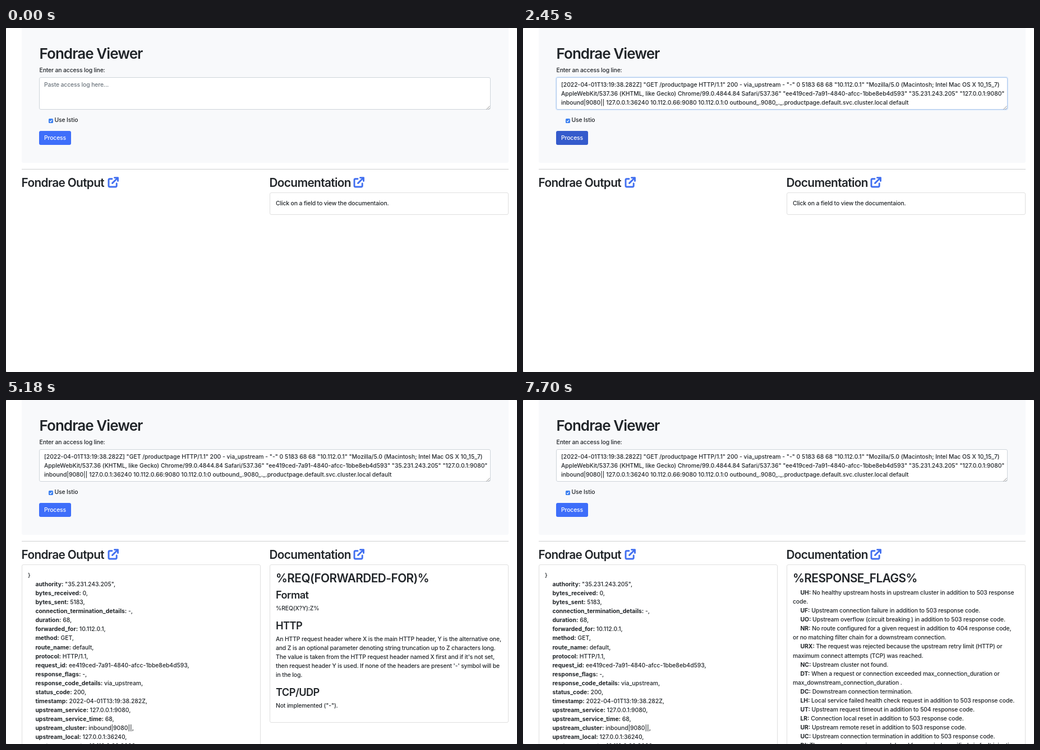
Write an HTML page that moves like this. It is 911 px wide and 615 px high and loops after 8.4 s.

```html
<!DOCTYPE html>
<html lang="en">
<head>
<meta charset="utf-8">
<title>Fondrae Viewer</title>
<style>
  html { font-size: 10.72px; background: #bbb; }
  html, body { margin: 0; width: 100%; height: 100%; overflow: hidden; }
  * { box-sizing: border-box; }
  #stage {
    position: relative; width: 911px; height: 615px; overflow: hidden;
    background: #fff; border-radius: 2px; color: #212529;
    font: 480 .97rem/1.5rem Inter, sans-serif; font-optical-sizing: none;
    letter-spacing: -.0125em; white-space: pre;
  }
  #stage > * { position: absolute; }
  h1, h2, h3 { margin: 0; font-weight: 580; }
  h1 { font-size: 2.425rem; line-height: 3rem; letter-spacing: -.036em; }
  h2 { font-size: 1.94rem; line-height: 2.4rem; letter-spacing: -.031em; }
  h3 { font-size: 1.6975rem; line-height: 2.1rem; letter-spacing: -.031em; margin-bottom: .5rem; }
  p { margin: 0 0 1rem; }
  b { margin-left: 1.25rem; letter-spacing: 0; }
  svg { fill: none; }
  #banner { left: 28px; top: 0; width: 868px; height: 241px; background: #f8f9fb; border-radius: 0 0 3px 3px; }
  #log { left: 59px; top: 88px; width: 805px; height: 58px; padding: 4.5px 8px; border: 1px solid; border-radius: 3px; background: #fff; }
  #log, #output { letter-spacing: -.0015em; }
  #log.empty { color: #6c757d; letter-spacing: inherit; }
  #caret { display: inline-block; width: 1px; height: 12px; margin-right: -1px; vertical-align: -2px; background: #212529; }
  #button { left: 59px; top: 184px; width: 57px; height: 25px; border-radius: 3px; color: #fff; text-align: center; line-height: 25px; }
  #rule { left: 28px; top: 252px; width: 868px; height: 1px; background: #cfd0d1; }
  .card { top: 294px; padding: 10.9px 10px; border: 1px solid #dfdfdf; border-radius: 3px; background: #fff; }
  .card h2 { margin-bottom: .5rem; letter-spacing: -.026em; }
  #output { left: 28px; width: 426px; height: 400px; }
  #docs { left: 470px; width: 426px; }
  .link { top: 266px; width: 20px; height: 20px; stroke: #416ff0; stroke-width: 2.9; stroke-linecap: round; stroke-linejoin: round; }
</style>
</head>
<body>
<div id="stage">
  <div id="banner"></div>
  <h1 style="left:59.5px;top:30px">Fondrae Viewer</h1>
  <div style="left:59.5px;top:67.5px">Enter an access log line:</div>
  <div id="log"></div>
  <svg style="left:856px;top:139px" width="7" height="7" stroke="#777" stroke-width=".8"><path d="M.5 6.5l6-6M3.8 6.5l2.7-2.7"/></svg>
  <svg style="left:76px;top:162px" width="8" height="8"><rect width="8" height="8" rx="1.6" fill="#3b7ff0"/><path d="M2 4.2l1.5 1.6L6.1 2.2" stroke="#fff" stroke-width="1.1"/></svg>
  <div style="left:86.5px;top:157px">Use Istio</div>
  <div id="button">Process</div>
  <div id="rule"></div>
  <h2 style="left:27.5px;top:264px">Fondrae Output</h2>
  <h2 style="left:469.5px;top:264px">Documentation</h2>
  <svg class="link" style="left:181px" viewBox="0 0 20 20"><path id="link" d="M8 3.8H4a2 2 0 0 0-2 2V16a2 2 0 0 0 2 2h10.2a2 2 0 0 0 2-2v-4M12.5 1.6h6v6M18.3 1.8L8.6 11.4"/></svg>
  <svg class="link" style="left:619px" viewBox="0 0 20 20"><use href="#link"/></svg>
  <div id="output" class="card"></div>
  <div id="docs" class="card"></div>
</div>
<script>
const LOOP = 8400, STEP = 70;
const $ = id => document.getElementById(id);

const logText = `[2022-04-01T13:19:38.282Z] "GET /productpage HTTP/1.1" 200 - via_upstream - "-" 0 5183 68 68 "10.112.0.1" "Mozilla/5.0 (Macintosh; Intel Mac OS X 10_15_7)
AppleWebKit/537.36 (KHTML, like Gecko) Chrome/99.0.4844.84 Safari/537.36" "ee419ced-7a91-4840-afcc-1bbe8eb4d593" "35.231.243.205" "127.0.0.1:9080"
inbound|9080|| 127.0.0.1:36240 10.112.0.66:9080 10.112.0.1:0 outbound_.9080_._.productpage.default.svc.cluster.local default`;

// Turns "key: value" lines into lines with a bold, indented key.
const boldKeys = text => text.replace(/^(\w+:) /gm, '<b>$1</b> ');

$('output').innerHTML = '}\n' + boldKeys(`authority: "35.231.243.205",
bytes_received: 0,
bytes_sent: 5183,
connection_termination_details: -,
duration: 68,
forwarded_for: 10.112.0.1,
method: GET,
route_name: default,
protocol: HTTP/1.1,
request_id: ee419ced-7a91-4840-afcc-1bbe8eb4d593,
response_flags: -,
response_code_details: via_upstream,
status_code: 200,
timestamp: 2022-04-01T13:19:38.282Z,
upstream_service: 127.0.0.1:9080,
upstream_service_time: 68,
upstream_cluster: inbound|9080||,
upstream_local: 127.0.0.1:36240,
upstream_remote: 10.112.0.66:9080,`);

const article = (title, ...sections) => `<h2>%${title}%</h2>` +
  sections.map(([head, body]) => `<h3>${head}</h3><p>${body}</p>`).join('');

const pages = [
  [0, 'Click on a field to view the documentaion.'],
  [3920, article('BYTES_RECEIVED',
    ['Description', 'Renders a numeric value in typed JSON logs.'],
    ['HTTP', 'Body bytes received.'],
    ['TCP', 'Downstream bytes received on connection.'],
    ['UDP', 'Not implemented (0).'])],
  [5180, article('REQ(FORWARDED-FOR)',
    ['Format', '%REQ(X?Y):Z%'],
    ['HTTP', `An HTTP request header where X is the main HTTP header, Y is the alternative one,
and Z is an optional parameter denoting string truncation up to Z characters long.
The value is taken from the HTTP request header named X first and if it's not set,
then request header Y is used. If none of the headers are present '-' symbol will be
in the log.`],
    ['TCP/UDP', 'Not implemented ("-").'])],
  [6230, article('ROUTE_NAME',
    ['HTTP/TCP', 'Name of the route.'],
    ['UDP', 'Not implemented ("-").'])],
  [7630, article('RESPONSE_FLAGS') + boldKeys(`UH: No healthy upstream hosts in upstream cluster in addition to 503 response
code.
UF: Upstream connection failure in addition to 503 response code.
UO: Upstream overflow (circuit breaking ) in addition to 503 response code.
NR: No route configured for a given request in addition to 404 response code,
or no matching filter chain for a downstream connection.
URX: The request was rejected because the upstream retry limit (HTTP) or
maximum connect attempts (TCP) was reached.
NC: Upstream cluster not found.
DT: When a request or connection exceeded max_connection_duration or
max_downstream_connection_duration .
DC: Downstream connection termination.
LH: Local service failed health check request in addition to 503 response code.
UT: Upstream request timeout in addition to 504 response code.
LR: Connection local reset in addition to 503 response code.
UR: Upstream remote reset in addition to 503 response code.
UC: Upstream connection termination in addition to 503 response code.
DI: The request processing was delayed for a period specified via fault injection`)],
];

const ramp = (t, start, end) => {
  const x = Math.min(1, Math.max(0, (t - start) / (end - start)));
  return x * x * (3 - 2 * x);
};
const within = (t, start, end) => t >= start && t < end;
const mix = (from, to, k) => `rgb(${from.map((v, i) => Math.round(v + (to[i] - v) * k))})`;

// Only touches the DOM when the markup differs.
const shown = {};
function setHTML(id, html) {
  if (shown[id] === html) return;
  shown[id] = html;
  $(id).innerHTML = html;
}

function render(now) {
  const t = Math.floor((now % LOOP) / STEP) * STEP;
  const pasted = t >= 1400, processed = t >= 2520;

  const caretOn = within(t, 70, 560) || within(t, 1120, 1890);
  const caret = caretOn ? '<span id="caret"></span>' : '';
  setHTML('log', pasted ? logText + caret : caret + 'Paste access log here...');
  $('log').className = pasted ? '' : 'empty';

  const focus = ramp(t, 10, 200) * (1 - ramp(t, 2370, 2520));
  $('log').style.borderColor = mix([206, 212, 218], [134, 183, 254], focus);
  $('log').style.boxShadow = `0 0 0 ${2.7 * focus}px rgba(13,130,253,${.28 * focus})`;

  const hover = processed ? 0 : ramp(t, 1960, 2100);
  $('button').style.background = mix([62, 110, 250], [53, 91, 204], hover);

  $('output').style.display = processed ? '' : 'none';
  setHTML('docs', pages.findLast(([start]) => t >= start)[1]);
}

const origin = performance.now();
function tick() {
  render(performance.now() - origin);
  requestAnimationFrame(tick);
}
tick();
</script>
</body>
</html>
```
